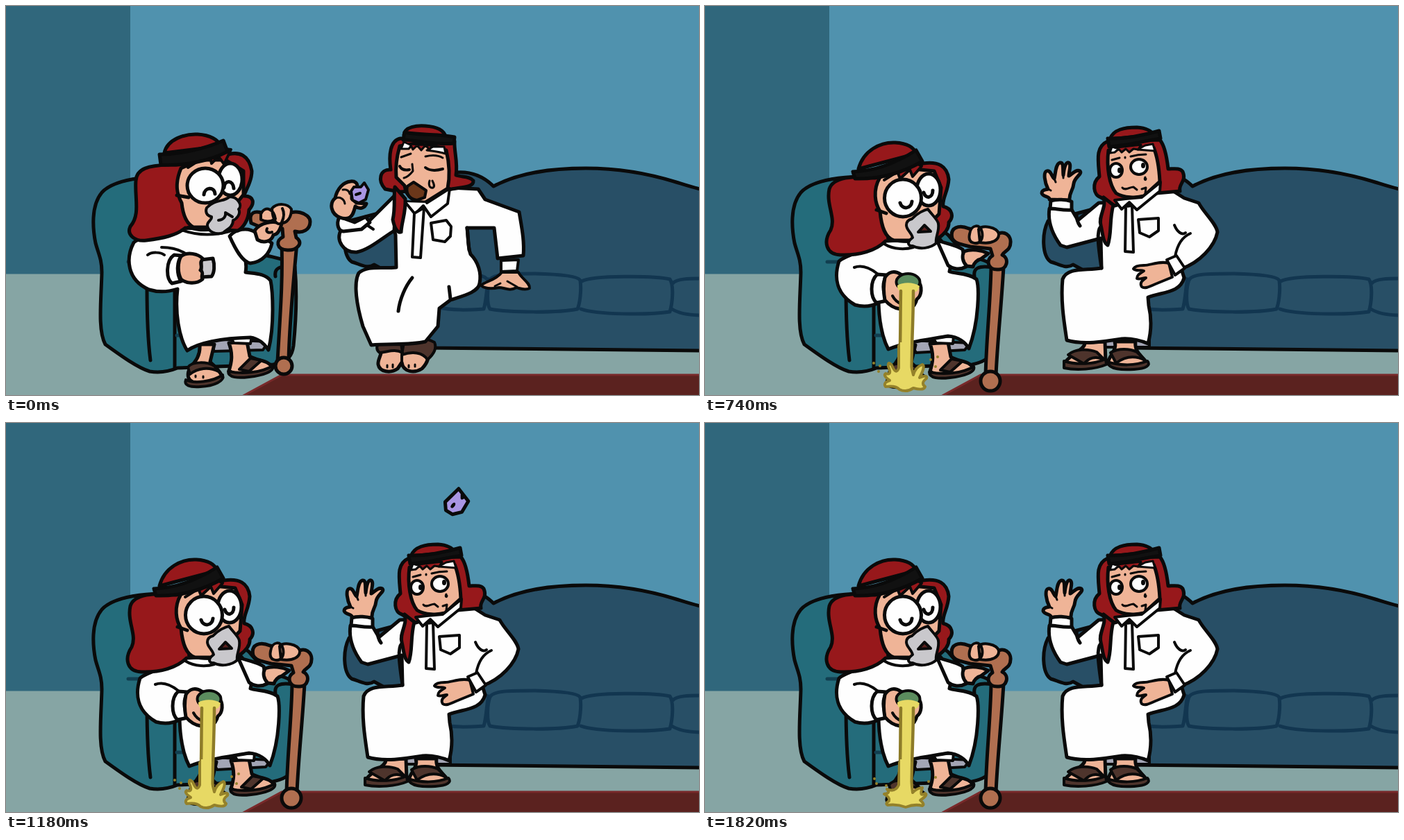
An HTML page without scripts for the animation above (1900 ms loop, 998x561 px).

```html
<!DOCTYPE html>
<html lang="en">
<head>
<meta charset="utf-8">
<title>Coffee visit</title>
<style>
@property --t { syntax: "<number>"; inherits: true; initial-value: 0; }
html, body { margin: 0; width: 100%; height: 100%; overflow: hidden; background: #5092ae; }
svg { display: block; width: 100vw; height: 100vh; }
.ink { stroke: #0a0a0a; stroke-width: 5; stroke-linecap: round; stroke-linejoin: round; fill: none; }
.thin { stroke-width: 4; }
.fine { stroke-width: 3; }
.w { fill: #fefefe; }
.s { fill: #efb497; }
.r { fill: #97181b; }
.k { fill: #111; }
.g { fill: #c9c8cc; }
.b { fill: #4e342c; }
.c { fill: #b06f50; }
.p { fill: #a996e4; }
.cup { fill: #5b8c5e; }
.shade { fill: #a3a5b5; }

/* one loop is 1900 ms */
.cut { animation: 1900ms step-end infinite; }
.oldSip { animation-name: oldSip; }
.oldPour { animation-name: oldPour; }
.nod { animation-name: nod; }
.sip { animation-name: sip; }
.wave { animation-name: wave; }
.flick { animation-name: flick; }
.full { animation-name: full; }
.flow { animation-name: flow; transform-origin: 290px 402px; }
.splash { animation-name: splash; }
.toss { animation-name: toss; }
@keyframes oldSip { 0% { visibility: visible } 26.3% { visibility: hidden } }
@keyframes oldPour { 0% { visibility: hidden } 26.3% { visibility: visible } }
@keyframes nod { 0% { transform: translate(0, 2.5px) } 32.6% { transform: none } }
@keyframes sip { 0% { visibility: visible } 36.8% { visibility: hidden } }
@keyframes wave { 0% { visibility: hidden } 36.8% { visibility: visible } }
@keyframes flick { 0% { transform: translate(-2px, -1px) } 43.1% { transform: none } }
@keyframes full { 0% { visibility: hidden } 26.3% { visibility: visible } 32.6% { visibility: hidden } }
@keyframes flow {
  0% { visibility: hidden }
  32.6% { visibility: visible; transform: scaleY(.4) }
  34.7% { visibility: visible; transform: scaleY(.75) }
  36.8% { visibility: visible; transform: none }
}
@keyframes splash {
  0% { transform: translateY(1800px) }
  45.2%, 57.8%, 70.5%, 83.1%, 95.7% { transform: none }
  36.8%, 49.4%, 62.1%, 74.7%, 87.3% { transform: translateY(600px) }
  41%, 53.6%, 66.3%, 78.9%, 91.5% { transform: translateY(1200px) }
}
@keyframes toss { 0% { visibility: hidden } 41% { visibility: visible } 76.8% { visibility: hidden } }
/* --t counts 40 ms steps from the top of the throw */
.arc {
  animation: arc 1900ms infinite;
  transform:
    translate(calc(624px + var(--t) * 7.7px), calc(94px + var(--t) * var(--t) * 2px))
    rotate(calc((var(--t) + 3.75) * 31deg));
}
@keyframes arc {
  0%, 38.9% { --t: -7.75; animation-timing-function: steps(18, jump-end) }
  76.795%, 100% { --t: 10.25 }
}
</style>
</head>
<body>
<svg viewBox="0 0 998 561" preserveAspectRatio="none">
<defs>
  <g id="oldFeet">
    <path class="s" d="M279 488C280 503 274 512 266 520C259 532 262 541 272 543C290 547 306 544 312 536C309 526 299 519 294 513L300 488Z"/>
    <path class="b thin" d="M262 521C268 512 290 513 300 519L306 527C292 520 276 522 265 531Z"/>
    <path class="b thin" d="M259 539C270 545 298 542 312 532C315 541 300 548 280 549C264 550 256 547 259 539Z"/>
    <path class="fine" d="M273 533V535M284 534V536"/>
    <path class="s" d="M321 486C327 502 325 514 321 526C333 534 370 532 382 521C380 511 362 512 351 505L347 484Z"/>
    <path class="b thin" d="M336 524L352 508L368 511L350 527Z"/>
    <path class="b thin" d="M320 527C340 531 368 529 384 519C387 527 370 533 350 535C334 537 320 536 320 527Z"/>
  </g>
</defs>

<rect width="998" height="561" fill="#5092ae"/>
<rect width="179" height="388" fill="#30677c"/>
<rect y="386.500" width="998" height="175" fill="#86a5a4"/>
<path d="M338 564L397 532H1002V564Z" fill="#5b221f" stroke="#79292a" stroke-width="3"/>

<g class="cut toss"><g class="arc ink">
  <path class="p" d="M-14-6L-5-17L6-18L14-9L10 18L-12 12Z"/>
  <ellipse class="k fine" cx="2" cy="-6" rx="1" ry="3"/>
  <path class="thin" d="M-4 14L-2 10L1 14"/>
</g></g>

<!-- sofa -->
<g class="ink">
  <path fill="#284f66" d="M570 290L494 310C485 328 485 360 498 369C510 372 520 380 530 373L580 400Z"/>
  <path fill="#284f66" d="M600 240H648C672 238 690 248 702 260C740 240 785 234 835 234C885 234 930 243 965 254C978 258 990 262 1004 265V497L604 493Z"/>
  <g stroke="#123650">
    <path d="M620 434C645 440 670 438 688 437C692 425 692 405 695 394M697 395C702 386 725 386 760 386C800 387 825 390 827 396C829 412 826 430 823 437C795 443 725 442 697 437C692 430 693 405 697 395"/>
    <path d="M829 397C845 388 935 389 956 394C962 402 960 428 956 441C925 446 850 445 828 437M960 400C966 393 985 393 1002 393M959 437C970 444 985 446 1002 446M640 390C665 385 685 386 693 394"/>
  </g>
</g>

<!-- armchair -->
<g class="ink">
  <path fill="#246c7b" d="M240 247C205 244 155 250 138 269C122 288 125 322 129 342C133 357 138 365 138 384C137 425 132 468 143 488C165 504 190 522 207 527C220 529 235 527 247 522L385 517C408 512 412 504 414 490C418 450 419 410 416 376C406 366 392 364 376 360L350 330Z"/>
  <path d="M203 405C203 440 204 480 208 511M243 410V522M388 390C386 378 394 374 414 377"/>
  <path stroke="#123f50" d="M176 369H190M246 475H256"/>
</g>

<!-- elder, resting -->
<g class="cut oldSip ink">
  <path class="shade thin" d="M290 480L300 498L370 496L378 484Z"/>
  <use href="#oldFeet"/>
  <path class="w thin" d="M324 478L328 486L352 487L354 476Z"/>
  <path class="w" d="M256 320C230 331 195 331 184 341C172 364 174 395 206 409C222 414 238 411 247 408C243 442 249 478 261 497C276 486 310 479 352 478C365 480 372 487 378 496C387 460 384 410 381 396C372 385 356 386 345 384C349 362 336 340 328 322Z"/>
  <path class="w" d="M322 332C330 322 348 318 360 327L383 342C380 356 370 369 352 371C340 369 330 350 322 332Z"/>
  <path class="r" d="M234 229C206 230 188 234 187 252C185 276 194 301 179 318C173 331 187 340 202 338C225 335 246 331 258 320L334 324C341 320 349 310 350 294C358 285 358 274 343 274C345 264 354 255 354 238C350 214 335 210 320 214Z"/>
  <path class="s" d="M252 234C242 258 247 273 253 284C255 303 260 314 270 319H305L342 272V238L316 222L280 222Z"/>
  <path class="thin" d="M253 323C275 331 300 331 322 325M262 319C276 324 290 324 300 322"/>
  <path class="r thin" d="M262 233L293 213L296 227L306 217L314 228L324 207L298 204Z"/>
  <path class="r" d="M228 212C232 192 258 184 276 185C294 186 306 193 309 202Z"/>
  <path class="k" d="M221 214C254 214 288 205 313 194L319 210C292 224 255 231 223 229Z"/>
  <path d="M246 273L263 276"/>
  <ellipse class="w" cx="323" cy="250" rx="17" ry="23"/>
  <ellipse class="w" cx="287" cy="259" rx="26" ry="25"/>
  <path d="M285 272C286 261 300 260 301 271M314 262C315 250 327 251 328 263"/>
  <path class="g thin" d="M289 291C301 278 314 283 322 275C334 275 341 288 335 293C339 300 331 308 327 309C327 321 315 323 313 327C302 331 291 325 290 317C289 311 297 309 296 304C288 302 287 296 289 291Z"/>
  <path class="thin" d="M306 309C314 308 317 303 316 298L326 304"/>
  <path class="thin" d="M204 359C210 354 223 355 228 359M224 348C238 348 250 352 257 356"/>
  <path class="w" d="M242 359C230 367 230 393 239 400L252 397C245 386 246 368 253 360Z"/>
  <path class="g" d="M281 366L298 364C301 374 300 385 296 390L281 391Z"/>
  <path class="s" d="M252 361C261 354 277 357 284 365C277 369 284 376 280 381C286 385 280 389 283 394C274 402 259 400 252 394C247 384 247 370 252 361Z"/>
  <path class="c" d="M397 342L419 342C414 395 408 460 407 512L391 513C394 455 399 400 397 342Z"/>
  <circle class="c" cx="400" cy="519" r="12"/>
  <path class="c" d="M353 313C349 298 358 294 371 299L400 304C412 291 438 298 438 311C438 323 427 328 416 325L418 334C430 342 418 353 405 352C389 351 388 338 399 333L398 321L374 322Z"/>
  <path class="s" d="M358 324C366 312 385 309 397 314C394 326 389 330 385 330C383 339 372 343 362 337Z"/>
  <path class="s thin" d="M383 292C391 283 406 285 411 293C411 305 405 313 397 313C389 318 384 307 383 292ZM367 300C374 286 386 294 388 307C382 311 375 312 367 308Z"/>
  <path class="thin" d="M376 321C373 326 379 328 383 326M398 292C401 298 400 306 397 312"/>
</g>

<!-- elder, pouring -->
<g class="cut oldPour ink">
  <path class="shade thin" d="M294 482L304 500L374 496L382 486Z"/>
  <use href="#oldFeet" x="3" y="1"/>
  <path class="w thin" d="M328 478L333 486L357 487L358 476Z"/>
  <path class="w" d="M262 338C235 352 204 358 193 368C185 393 190 416 216 431C230 435 242 432 250 428C251 460 256 480 264 495C288 485 322 481 350 476C365 477 375 485 380 494C395 455 395 405 391 394C380 385 360 386 352 383C357 365 347 345 336 334Z"/>
  <path class="w" d="M334 338C345 342 360 344 371 351L376 376C365 382 355 378 350 374Z"/>
  <g class="cut nod">
    <path class="r" d="M245 248C214 244 184 247 179 264C174 286 189 306 181 323C170 340 174 358 195 359C222 360 246 353 260 339L336 335C343 330 352 322 351 312C359 304 356 292 343 289C341 278 350 268 351 250C349 230 335 224 314 227Z"/>
    <path class="s" d="M252 247C241 266 245 285 252 296C254 318 259 334 272 338H300L337 300L340 262L330 238L290 234Z"/>
    <path class="thin" d="M258 343C272 352 290 351 300 348M263 335C275 340 285 340 294 340"/>
    <path class="r thin" d="M258 251L277 239L281 249L295 236L299 246L312 231L300 224Z"/>
    <path class="r" d="M221 235C228 208 253 196 274 197C291 198 301 204 304 213Z"/>
    <path class="k" d="M213 239C248 238 279 224 304 208L313 224C284 241 252 250 216 249Z"/>
    <path d="M247 294L261 299"/>
    <ellipse class="w" cx="322" cy="265" rx="17" ry="23"/>
    <ellipse class="w" cx="285" cy="277" rx="26.500" ry="27"/>
    <path d="M281 284C284 294 297 293 298 282M315 269C318 279 328 277 328 266"/>
    <path class="g thin" d="M298 307C305 299 316 294 321 293C326 300 336 309 336 314C338 324 331 335 333 342C325 349 310 352 299 346C292 346 290 341 299 334C297 326 290 323 290 316C290 310 294 308 298 307Z"/>
    <path class="thin" fill="#5b201d" d="M307 326L316 316L325 325Z"/>
  </g>
  <path class="thin" d="M215 377C226 373 238 378 248 386"/>
  <path class="w" d="M248 387C237 397 238 420 247 428L262 425C255 410 256 397 262 388Z"/>
  <path class="s" d="M259 392C264 383 273 381 282 387L306 396C314 404 312 418 305 423C302 436 290 441 281 437C272 436 264 430 259 424C257 413 257 402 259 392Z"/>
  <path class="thin" d="M270 418C276 430 290 434 302 429"/>
  <g class="cut full">
    <ellipse class="thin cup" cx="294" cy="403" rx="18" ry="15"/>
    <path fill="#e7d963" stroke="none" d="M277 406C288 399 302 399 311 406C307 415 300 417 293 417C286 417 280 414 277 406Z"/>
  </g>
  <path class="c" d="M412 377L430 376C427 430 421 485 419 533L404 535C405 480 411 430 412 377Z"/>
  <circle class="c" cx="411" cy="541" r="14"/>
  <path class="c" d="M356 335C352 319 366 315 380 321L418 331C431 321 441 332 440 341C440 353 431 353 428 359C439 364 435 381 422 380C407 381 404 366 414 360L411 350L382 347C370 344 360 343 356 335Z"/>
  <path class="s" d="M373 354C384 350 398 352 408 357L397 365C392 366 387 371 386 376L377 375C370 368 370 360 373 354Z"/>
  <path class="s thin" d="M394 322C400 315 420 319 423 328C424 337 414 344 396 341ZM381 329C383 314 397 314 399 326C401 337 395 345 385 341C380 339 380 334 381 329Z"/>
</g>

<!-- coffee -->
<g stroke-linejoin="round" stroke-linecap="round">
  <g class="cut flow">
    <ellipse class="ink thin" style="fill:#5b8c5e" cx="292.500" cy="398" rx="17" ry="12"/>
    <path fill="#e7d964" d="M277 403C285 398 301 398 309 404C307 412 303 413 300 412L298 545H279L281 411C278 410 277 407 277 403Z"/>
    <path fill="none" stroke="#8d7b28" stroke-width="4.500" d="M282 411C281 455 282 500 279 540M300 411C300 455 297 500 297 540"/>
  </g>
  <g class="cut splash" fill="#e7d964" stroke="#94812a" stroke-width="4">
    <g>
      <path d="M279 522Q274 533 262 528Q268 534 258 535Q267 540 265 545Q259 549 263 551Q276 549 289 554Q302 549 313 552Q317 550 310 544Q322 536 317 534Q308 540 313 526Q306 526 299 533L297 517V490H280Z"/>
      <path stroke="none" d="M281 485H296L295 544H281Z"/>
      <path fill="none" d="M247 520V520.100M244 513V513.100M261 523V523.100M322 517V517.100M332 511V511.100"/>
    </g>
    <g transform="translate(0 -600)">
      <path d="M279 522Q275 533 269 518Q263 511 264 520Q270 533 260 530Q256 533 266 540Q256 543 260 549Q275 547 280 553Q290 558 300 551Q315 555 317 549Q310 544 319 537Q321 531 309 536Q318 519 313 517Q303 521 300 532L297 520V490H279Z"/>
      <path stroke="none" d="M281 485H296L295 544H281Z"/>
      <path fill="none" d="M243 515V515.100M252 519V519.100M250 527V527.100M325 510V510.100M335 506V506.100M332 520V520.100"/>
    </g>
    <g transform="translate(0 -1200)">
      <path d="M279 520Q273 531 266 522Q271 534 257 535Q267 541 265 546Q259 550 264 552Q277 548 289 555Q302 549 314 551Q317 548 311 544Q322 538 318 535Q308 539 309 521Q303 523 300 532L297 518V490H279Z"/>
      <path stroke="none" d="M281 485H296L295 544H281Z"/>
      <path fill="none" d="M249 514V514.100M256 521V521.100M320 521V521.100M329 514V514.100"/>
    </g>
  </g>
</g>

<!-- guest, drinking -->
<g class="cut sip ink">
  <path class="s" d="M540 490C543 503 535 508 536 517C538 528 554 530 564 523L570 514C572 528 588 530 599 523C608 514 610 505 608 490Z"/>
  <path class="b thin" d="M537 487C548 483 560 484 569 487L571 500C560 494 550 499 538 500C533 496 533 490 537 487ZM573 485C588 478 604 478 617 485C621 494 615 503 607 510C600 499 585 498 570 503Z"/>
  <path class="thin" d="M570 503V516"/>
  <path class="fine" d="M549 518V521M557 517V521M580 518V521M589 517V520"/>
  <path class="w" d="M566 282C555 292 556 315 561 330L562 377C540 379 520 374 508 385C500 400 505 432 514 462L526 489C550 486 580 490 604 484L622 462L624 436L640 424C658 418 680 413 682 400C685 385 680 369 669 358C664 345 666 330 664 320L703 320L708 364L745 360C747 338 742 316 739 297L690 279L680 264L640 262L605 284Z"/>
  <path class="w" d="M562 271L546 287L517 316L483 322C474 338 486 356 505 355C522 352 540 336 559 324Z"/>
  <path class="w" d="M480 304C475 315 479 325 486 325L512 322L524 312L518 304L502 312Z"/>
  <path class="thin" d="M520 316L529 322"/>
  <path class="s" d="M481 305C468 300 465 285 474 277C477 263 486 254 496 253C503 252 506 256 506 260L498 271V278L505 284L519 285C517 291 510 294 503 289C501 296 500 302 495 305C491 307 486 307 481 305Z"/>
  <path class="p thin" d="M497 267L501 261L511 261L516 255L522 265L518 279L508 284L499 280Z"/>
  <path class="thin" d="M504 272L510 270"/>
  <path class="fine" d="M474 278C480 274 487 278 488 285M485 265C491 264 494 267 495 271"/>
  <path class="r" d="M568 191C553 194 551 215 554 236C538 235 535 252 546 264L566 268L637 265C655 261 674 262 673 252C668 245 656 247 648 244C651 226 645 209 646 195Z"/>
  <path class="r" d="M560 261L575 278C576 298 570 310 569 326C563 328 559 318 557 308C561 291 558 276 560 261Z"/>
  <path class="s" d="M567 202C562 220 561 236 562 247L574 259C576 276 589 284 604 283L636 263C640 244 638 225 634 208L604 196Z"/>
  <path class="w fine" d="M569 206L573 196L584 201L580 206ZM606 208L615 203L631 203L633 213C625 210 615 209 606 208Z"/>
  <path class="r fine" d="M582 199L586 207L592 201L598 208L604 201L610 207L614 201Z"/>
  <path class="r" d="M573 186C574 174 592 172 604 173C620 174 630 178 633 188Z"/>
  <path class="k" d="M574 182C598 187 622 184 646 189L645 198C620 201 596 194 572 193Z"/>
  <path class="thin" d="M567 231C570 237 576 237 581 236M604 233C612 239 622 237 629 235"/>
  <path class="fine" d="M569 218L583 213M604 217C612 215 622 215 629 219M585 228L586 238C582 243 578 247 573 248M610 252C608 258 610 263 615 262C618 260 616 256 614 252"/>
  <path class="thin" fill="#6b371a" d="M578 260L587 254L605 266L603 276L592 280C583 279 575 272 578 260Z"/>
  <path class="w thin" d="M575 283L589 300L601 288L612 304L636 285L639 263L606 284"/>
  <path class="w thin" d="M588 299L585 362L597 363L602 291Z"/>
  <path class="w thin" d="M612 313L634 309L641 318L640 332L632 340L615 337Z"/>
  <path d="M585 392C575 404 567 423 565 440M638 405L640 422M664 320L667 352"/>
  <path class="s thin" d="M714 384L738 384C742 393 755 399 754 407C747 411 740 407 735 406C725 412 718 406 710 406C700 408 690 408 684 403C690 397 705 396 714 384Z"/>
  <path class="w thin" d="M713 367L738 366L736 382L713 383Z"/>
  <path class="fine" d="M722 397L736 405M712 400L704 404"/>
</g>

<!-- guest, throwing -->
<g class="cut wave ink">
  <path class="shade thin" d="M552 480H640V492H560Z"/>
  <path class="s" d="M547 485C548 495 530 500 520 512C530 524 560 522 577 514L576 484ZM590 484C594 496 582 504 580 515C595 524 622 522 636 515C630 504 618 500 620 484Z"/>
  <path class="b thin" d="M523 503C533 494 552 494 564 499L575 510C562 504 552 508 546 516ZM584 500C595 493 612 494 622 499L634 511C618 503 604 506 592 515Z"/>
  <path class="b thin" d="M517 512C535 518 560 517 577 509L578 517C562 524 535 526 517 522ZM579 513C598 519 620 519 637 512C643 518 635 523 618 524C602 525 582 525 579 513Z"/>
  <path class="w" d="M592 283L567 284L537 309L527 292H496C493 312 501 330 512 345L521 348L570 335L571 378C548 382 522 376 515 394C512 425 517 455 521 482C545 489 575 484 600 480C615 479 630 483 638 487C644 465 642 445 639 432L638 420C660 412 684 414 690 392L686 379C712 370 734 347 738 326C736 313 718 298 711 284L690 277L657 256L615 286Z"/>
  <path d="M535 300C535 308 537 313 540 317M570 318C563 325 567 350 571 378"/>
  <g class="cut flick">
    <path class="s" d="M498 280C499 275 489 277 487 271C487 265 494 266 496 265C491 255 489 241 494 239C500 237 501 247 505 250C507 241 507 229 513 227C519 226 517 235 518 245C519 236 521 225 526 227C530 230 526 239 526 246C530 244 536 236 542 239C546 243 534 248 533 257C532 268 526 270 527 281Z"/>
    <path class="fine" d="M505 250L507 255M518 245V249M496 265L500 267"/>
  </g>
  <path class="w" d="M498 281C507 278 520 279 528 282L528 294C516 295 505 292 497 292Z"/>
  <path class="r" d="M580 195C562 203 566 222 568 246C557 255 559 273 570 276L590 288L650 270L684 267C681 257 694 253 688 239C684 233 675 235 667 235C665 217 662 201 655 193Z"/>
  <path class="r" d="M574 276C579 289 566 304 570 316C573 329 573 341 580 345C586 328 582 309 588 287Z"/>
  <path class="s" d="M581 208C578 232 582 258 592 270C603 277 622 277 632 274L655 253C654 234 651 216 646 204L610 204Z"/>
  <path class="w fine" d="M583 212L586 203L596 206L590 211ZM623 207L634 201L645 199L648 209Z"/>
  <path class="r fine" d="M594 204L600 211L606 206L611 211L617 206L624 207L628 200Z"/>
  <path class="r" d="M583 192C588 178 604 175 622 175C635 176 643 180 646 186Z"/>
  <path class="k" d="M580 191C607 192 630 187 654 180L656 191C632 195 607 201 582 203Z"/>
  <ellipse class="w thin" cx="592" cy="237" rx="9" ry="10"/>
  <ellipse class="w thin" cx="625" cy="232" rx="12" ry="11"/>
  <path class="fine" d="M586 222L597 219M613 217C620 215 628 214 635 214M601 262C605 267 612 261 617 261L622 265M634 247C632 251 635 252 635 249M605 218V219M629 264L635 262L634 270"/>
  <ellipse class="k fine" cx="597" cy="237" rx="1.500" ry="2.500"/>
  <ellipse class="k fine" cx="631" cy="230" rx="1.500" ry="2.500"/>
  <path class="w thin" d="M590 280L600 293L611 283L622 294L655 267L656 254L629 276L606 278Z"/>
  <path class="w thin" d="M606 289L605 354L617 355L615 288Z"/>
  <path class="w thin" d="M624 308L653 306V324L640 333L626 327Z"/>
  <path class="thin" d="M676 316C680 326 687 331 692 327M699 328C687 333 680 345 677 361"/>
  <path class="s thin" d="M668 371C655 367 642 374 632 374C624 374 619 375 617 379C621 383 627 380 632 382C626 386 622 388 622 393C626 395 630 392 635 392C628 397 626 400 629 405C634 409 643 403 651 400L673 391Z"/>
  <path class="w thin" d="M665 366L679 360L691 378L677 388Z"/>
</g>
</svg>
</body>
</html>
```
